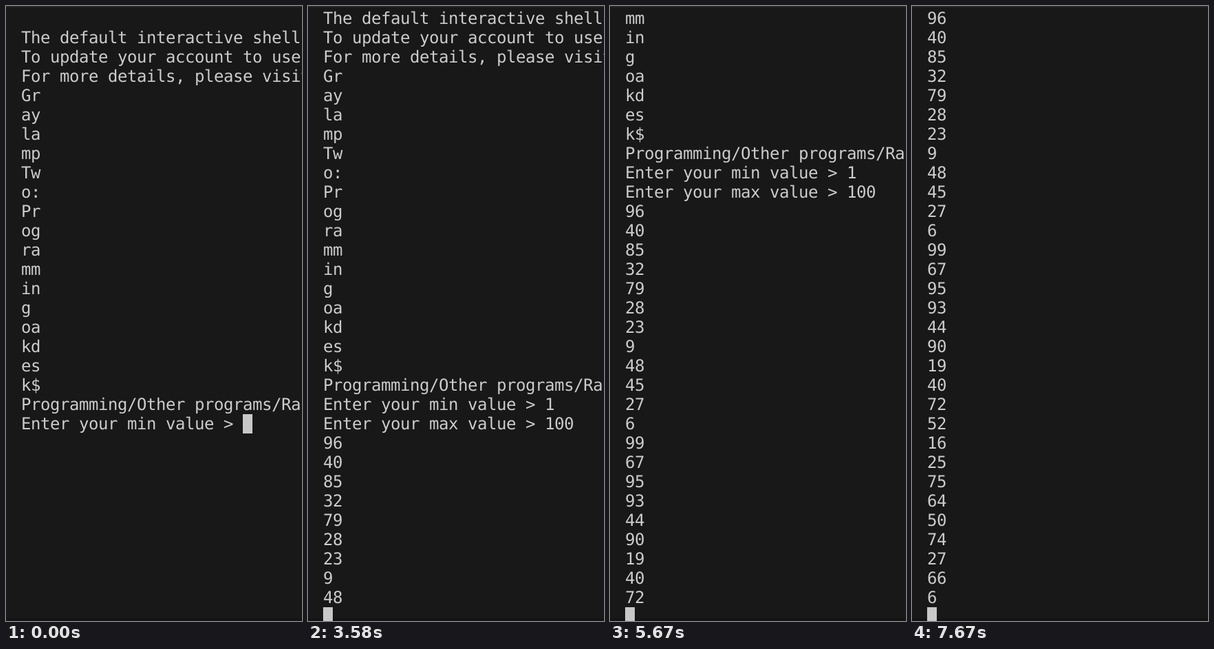
An HTML page for the animation above (8000 ms loop, 430 px wide and 892 px high).

```html
<!DOCTYPE html>
<html lang="en">
<head>
<meta charset="utf-8">
<title>Random numbers in a terminal</title>
<style>
  html, body { margin: 0; width: 100%; height: 100%; overflow: hidden; background: #181818; }
  svg { display: block; }
  text {
    font: 24px "DejaVu Sans Mono", monospace;
    fill: #cccccc;
    white-space: pre;
    text-rendering: geometricPrecision;
  }
</style>
</head>
<body>
<svg id="stage" width="430" height="892" viewBox="0 0 430 892">
  <rect width="430" height="892" fill="#181818"/>
  <rect width="430" height="1.5" fill="#2b2b2b"/>
  <rect y="888" width="430" height="4" fill="#141414"/>
  <g id="rows"></g>
  <rect id="cursor" width="14" height="28" fill="#c8c8c8"/>
</svg>
<script>
const LOOP = 8000, ROWS = 32, CELL = 14, LINE = 28, LEFT = 22, TOP = 4, BASE = 22;
const NS = "http://www.w3.org/2000/svg";

// The prompt wraps after two columns.
const prompt = "Graylamp Two:Programming oakdesk$"
  .replace("Graylamp Two", "GraylampTwo")
  .match(/../g);
const wrapped = ["Gr", "ay", "la", "mp", "Tw", "o:", "Pr", "og", "ra", "mm", "in", "g ", "oa", "kd", "es", "k$"];

const intro = [
  "",
  "The default interactive shell",
  "To update your account to use",
  "For more details, please visit",
  ...wrapped,
  "Programming/Other programs/Ra",
  "Enter your min value > "
].join("\n");

// Output events: [tick, text], twelve ticks per second.
const events = [
  [6, "1"], [8, "\nEnter your max value > "],
  [11, "1"], [13, "0"], [14, "0"], [27, "\n"]
];
const bursts = [[28, 6], [40, 2], [43, 3], [52, 5], [63, 2], [66, 3], [75, 3], [79, 2], [87, 4], [92, 1]];
const numbers = [
  96, 40, 85, 32, 79, 28, 23, 9, 48, 45, 27, 6, 99, 67, 95, 93,
  44, 90, 19, 40, 72, 52, 16, 25, 75, 64, 50, 74, 27, 66, 6
];
let next = 0;
for (const [start, count] of bursts)
  for (let i = 0; i < count; i++) events.push([start + i, numbers[next++] + "\n"]);

const tickTime = tick => Math.round(tick * 100 / 12) * 10;

const group = document.getElementById("rows");
const cursor = document.getElementById("cursor");
const columns = Array.from({ length: 31 }, (_, i) => LEFT + i * CELL).join(" ");
const rows = Array.from({ length: ROWS }, (_, i) => {
  const row = document.createElementNS(NS, "text");
  row.setAttribute("x", columns);
  row.setAttribute("y", TOP + i * LINE + BASE);
  group.appendChild(row);
  return row;
});

let shown = -1;
function draw(time) {
  const done = events.filter(([tick]) => tickTime(tick) <= time);
  if (done.length === shown) return;
  shown = done.length;
  const lines = (intro + done.map(e => e[1]).join("")).split("\n");
  const last = lines[lines.length - 1];
  const view = lines.slice(-ROWS);
  rows.forEach((row, i) => { row.textContent = view[i] || ""; });
  cursor.setAttribute("x", LEFT + last.length * CELL);
  cursor.setAttribute("y", TOP + (view.length - 1) * LINE);
}

const begin = performance.now();
function frame() {
  draw((performance.now() - begin) % LOOP);
  requestAnimationFrame(frame);
}
draw(0);
requestAnimationFrame(frame);
</script>
</body>
</html>
```
